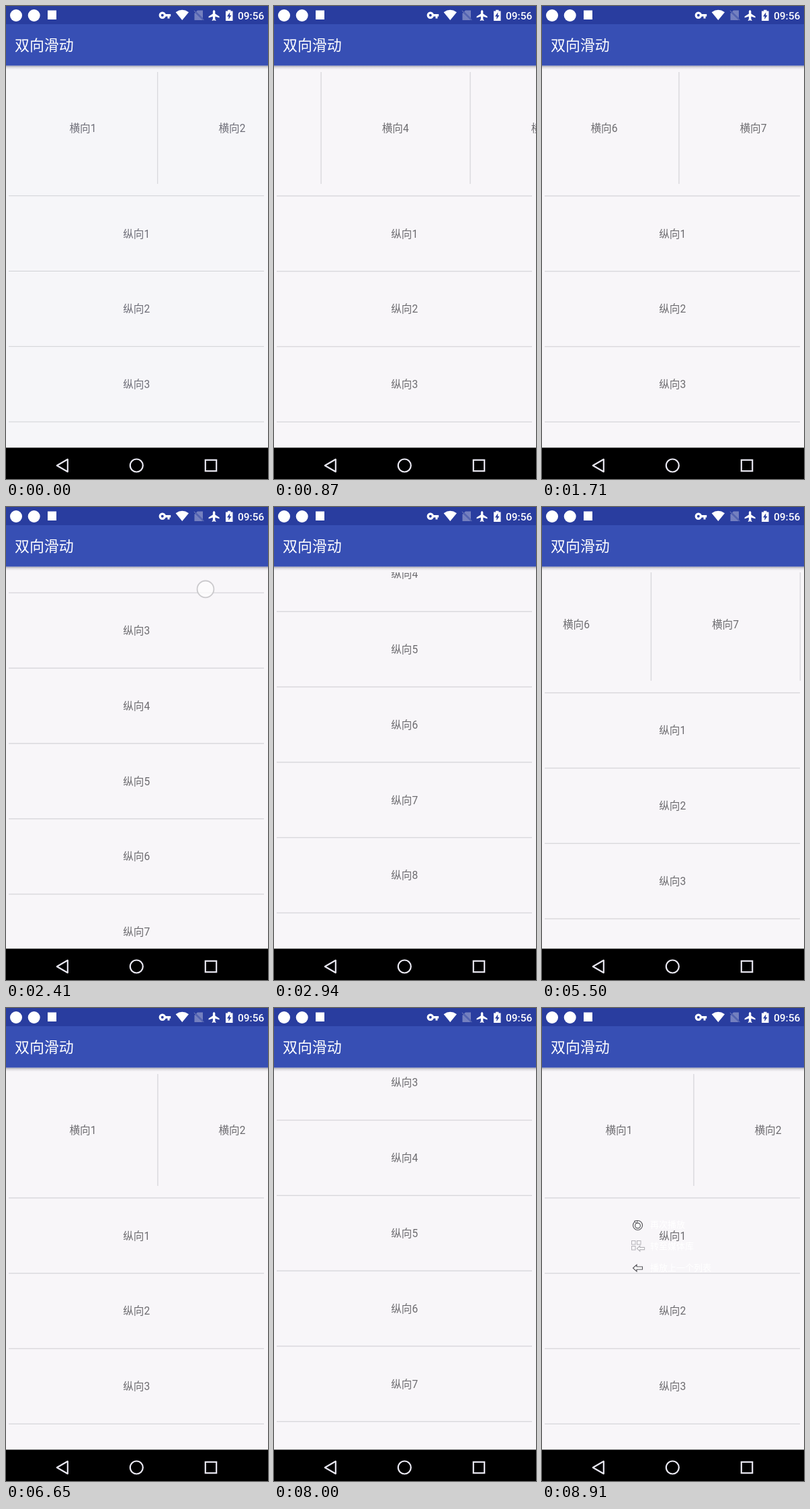
An HTML page with a canvas that plays this animation: 390 px wide and 702 px high, repeating every 8990 ms.

```html
<!DOCTYPE html>
<html lang="zh">
<head>
<meta charset="utf-8">
<style>
  html, body { margin: 0; width: 100%; height: 100%; overflow: hidden; background: #f8f6f9; }
  canvas { display: block; }
</style>
</head>
<body>
<canvas id="stage" width="390" height="702"></canvas>
<script>
const ctx = document.getElementById('stage').getContext('2d');
const LOOP = 8990, FIRST_MOVE = 180, UPDATE = 76.5;
const FONT = '"Roboto", "Noto Sans CJK SC", "Noto Sans CJK", sans-serif';
const COLUMN = 222, ROW = 111.8, COUNT = 12;
const WHITE = '#fff', STATUS = '#293d9f';

// Each swipe: axis, start and end in ms, scroll offset it comes to rest at.
const swipes = [
  ['x', 180, 1020, 620], ['x', 1100, 1940, 1173.5],
  ['y', 2020, 2930, 573.9], ['y', 2940, 3710, 740],
  ['y', 3930, 4620, 601.3], ['y', 5090, 5500, 0],
  ['x', 5800, 6600, 0],
  ['y', 7100, 7900, 450.8], ['y', 8000, 8370, 180], ['y', 8520, 8900, 0]
];

const easeOut = u => 1 - (1 - u) ** 2;

// The screen refreshes in steps.
const stepTime = t =>
  FIRST_MOVE + UPDATE * Math.floor((t - FIRST_MOVE) / UPDATE + 0.05);

function poseAt(t) {
  const pose = { x: 0, y: 0, touch: null };
  for (const [axis, start, end, to] of swipes) {
    if (t <= start) break;
    const u = Math.min(1, (t - start) / (end - start));
    const from = pose[axis];
    const moved = (to - from) * easeOut(u);
    pose[axis] += moved;
    if (u < 0.6) {
      const forward = to > from;
      pose.touch = axis === 'x'
        ? [(forward ? 325 : 65) - moved, 190]
        : [297, (forward ? 500 : 285) - moved];
    } else {
      pose.touch = null;
    }
  }
  return pose;
}

function rect(x, y, w, h, color) {
  ctx.fillStyle = color;
  ctx.fillRect(x, y, w, h);
}

function text(str, x, y, size, color, align = 'left', weight = 400) {
  ctx.font = `${weight} ${size}px ${FONT}`;
  ctx.textAlign = align;
  ctx.fillStyle = color;
  ctx.fillText(str, x, y);
}

function paint(fill, stroke, width) {
  if (fill) { ctx.fillStyle = fill; ctx.fill(); }
  if (stroke) { ctx.strokeStyle = stroke; ctx.lineWidth = width; ctx.stroke(); }
}

function poly(points, fill, stroke, width = 1) {
  ctx.beginPath();
  points.forEach(([x, y]) => ctx.lineTo(x, y));
  ctx.closePath();
  paint(fill, stroke, width);
}

function circle(x, y, r, fill, stroke, width = 1) {
  ctx.beginPath();
  ctx.arc(x, y, r, 0, Math.PI * 2);
  paint(fill, stroke, width);
}

function drawLists({ x, y }, opening) {
  const line = opening ? '#d0d1d5' : '#d9d8dc';
  const ink = opening ? '#6d6d77' : '#6c6b6f';
  const weight = opening ? 1 : 1.4;
  ctx.save();
  ctx.beginPath();
  ctx.rect(0, 97, 390, 550);
  ctx.clip();
  for (let i = 0; i < COUNT; i++) {
    const left = COLUMN * i - x, top = ROW * i - y;
    text('横向' + (i + 1), 114.5 + left, 186.6 - y, 15.6, ink, 'center');
    rect(225.2 + left, 98 - y, weight, 166, line);
    rect(4, 281.2 + top, 380, weight, line);
    text('纵向' + (i + 1), 194.2, 343.6 + top, 15.6, ink, 'center');
  }
  ctx.restore();
}

function drawPlane(x, y) {
  const half = [[0, -8.2], [1.7, -6.5], [1.7, -2.4], [8, 1.6], [8, 3.5], [1.7, 1.5], [1.7, 5.2], [3.2, 8]];
  const other = half.map(([px, py]) => [-px, py]).reverse();
  poly([...half, [0, 7.2], ...other].map(([px, py]) => [x + px, y + py]), WHITE);
}

function drawStatusIcons() {
  circle(15, 14, 9, WHITE);
  circle(41.7, 14, 9, WHITE);
  rect(62, 6.5, 13, 13.5, WHITE);

  // key
  circle(232.8, 13.7, 3.6, null, WHITE, 3.2);
  rect(236, 12, 9.2, 3.5, WHITE);
  rect(240.5, 14, 3, 4.5, WHITE);

  // wireless signal
  ctx.beginPath();
  ctx.moveTo(262.3, 21);
  ctx.lineTo(252.6, 9.2);
  ctx.quadraticCurveTo(262.3, 2.4, 272, 9.2);
  paint(WHITE);

  // missing card
  poly([[285, 6.5], [293, 6.5], [293, 21], [280.5, 21], [280.5, 11]], '#7480bf');
  poly([[279, 7], [280, 6], [295, 20.5], [294, 21.5]], '#7480bf', STATUS, 0.8);

  drawPlane(309.6, 14);

  // charging battery
  rect(327, 7.5, 10.5, 14.5, WHITE);
  rect(330, 5.8, 4.5, 2, WHITE);
  poly([[333.4, 9.2], [329, 15.4], [331.6, 15.4], [331.2, 20], [335.6, 13.8], [333, 13.8]], STATUS);

  text('09:56', 345, 19.5, 15.5, WHITE, 'left', 500);
}

function drawBars() {
  const shadow = ctx.createLinearGradient(0, 88.5, 0, 94.5);
  shadow.addColorStop(0, 'rgba(60,60,75,.42)');
  shadow.addColorStop(0.45, 'rgba(60,60,75,.13)');
  shadow.addColorStop(1, 'rgba(60,60,75,0)');
  rect(0, 88.5, 390, 6, shadow);
  rect(0, 27, 390, 61.5, '#374fb4');
  rect(0, 0, 390, 27, STATUS);
  drawStatusIcons();
  text('双向滑动', 13, 66.2, 21.9, WHITE);

  const icon = '#e9e8f2';
  rect(0, 655.5, 390, 46.5, '#000');
  ctx.lineJoin = 'round';
  poly([[75.8, 682], [91.8, 672.8], [91.8, 691.2]], null, icon, 2.2);
  ctx.lineJoin = 'miter';
  circle(194.3, 682, 9.5, null, icon, 2.2);
  ctx.strokeRect(296.8, 673.8, 16.4, 16.4);
}

function arrow(x, y, s, color) {
  const shape = [[-7, 0], [-1.5, -5], [-1.5, -2], [7, -2], [7, 2], [-1.5, 2], [-1.5, 5]];
  poly(shape.map(([px, py]) => [x + px * s, y + py * s]), WHITE, color, 1.1);
}

function drawMenu() {
  const dark = '#55545a', pale = '#b5b4b9';
  circle(142.5, 322.5, 7, WHITE, dark, 1.2);
  circle(142.5, 323, 3.9, null, dark, 1.2);
  poly([[137.5, 316], [142.5, 315.5], [140.5, 320]], WHITE, dark);
  ctx.strokeStyle = pale;
  for (const [x, y] of [[0, 0], [8, 0], [0, 8]]) ctx.strokeRect(133.5 + x, 345.5 + y, 5.5, 5.5);
  arrow(147, 357, 0.8, pale);
  arrow(142.5, 386, 1, dark);
  ['再次播放', '转至媒体库', '播放上一个列表'].forEach((label, i) =>
    text(label, 161, 325.5 + i * 32.2, 13, WHITE));
}

function draw(now) {
  const t = stepTime(now % LOOP);
  const opening = t < FIRST_MOVE;
  const pose = poseAt(t);
  rect(0, 0, 390, 702, opening ? '#f6f6f9' : '#f8f6f9');
  drawLists(pose, opening);
  drawBars();
  if (pose.touch) circle(...pose.touch, 12.4, 'rgba(252,252,253,.8)', '#cbcacd', 1.8);
  if (t > 8900) drawMenu();
}

const start = performance.now();
function tick() {
  draw(performance.now() - start);
  requestAnimationFrame(tick);
}
tick();
</script>
</body>
</html>
```
